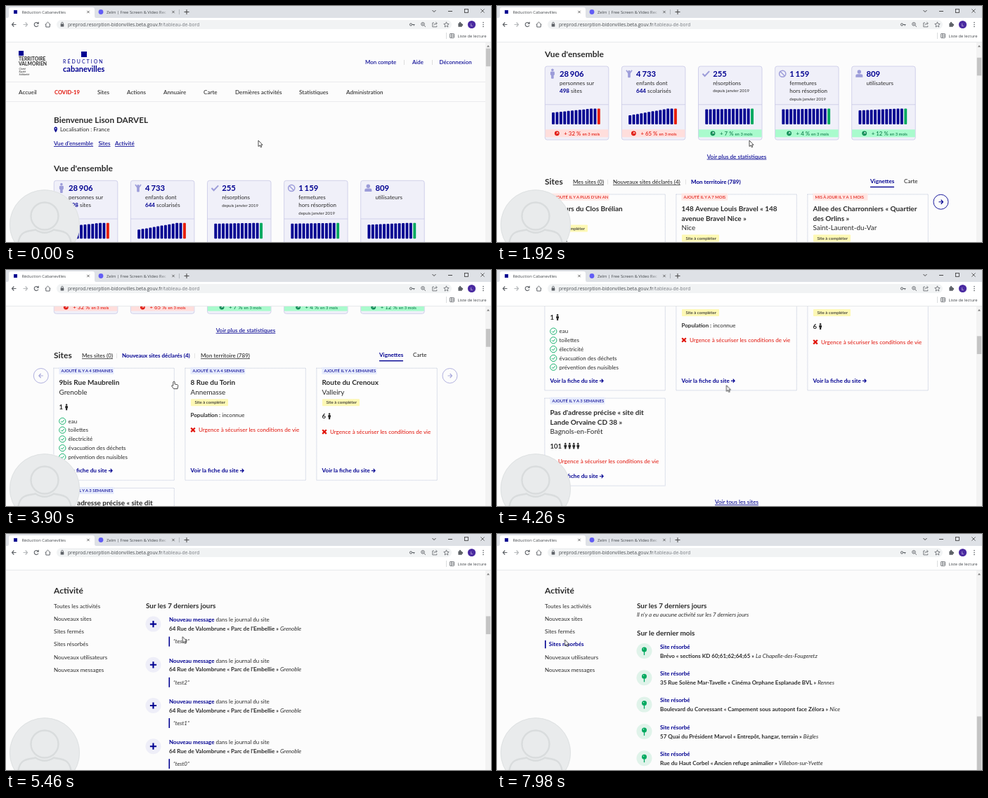
Animation, 690 px wide and 337 px high, one loop 8 s. Source, as an HTML page:

```html
<!DOCTYPE html>
<html lang="fr">
<head>
<meta charset="utf-8">
<title>Tableau de bord</title>
<style>
@property --s { syntax: "<number>"; inherits: true; initial-value: 0; }
html, body { margin: 0; width: 100%; height: 100%; overflow: hidden; background: #fcfcfc; }
svg { display: block; width: 690px; height: 337px; animation: scroll 8s linear infinite; }
text { font-family: Lato, sans-serif; fill: #2b2b2b; white-space: pre; }
.ui { font-family: "Open Sans", sans-serif; fill: #45494d; }
.m { font-weight: 500; }
.b { font-weight: 700; }
.i { font-style: italic; }
.n { fill: #000091; }
.r { fill: #e1140a; }
.g { fill: #0a7a48; }
.w { fill: #fff; }
.l { text-decoration: underline; text-decoration-thickness: .7px; text-underline-offset: 1.2px; }
.tight { word-spacing: -1px; }
#page { transform: translateY(calc(var(--s) * -1px)); }
#thumb { transform: translateY(calc(var(--s) * .0805px)); }
#cursor { animation: move 8s ease-in-out infinite; }
</style>
</head>
<body>
<script>
const LOOP = 8000, NAVY = '#000091', LILAC = '#9c9cd9', RED = '#e1140a', GREEN = '#00a95f', INK = '#2b2b2b';
const ADD_TAB = 3360, PICK_NEW = 5940, PICK_DONE = 7080;
let css = '', spans = 0;

const pct = t => +(t / LOOP * 100).toFixed(3) + '%';
const each = (list, fn) => list.map(fn).join('');
const track = (name, points, rule) =>
  css += `@keyframes ${name}{${each(points, p => `${pct(p[0])}{${rule(p)}}`)}}`;

// Shows a group only from a to b.
function span(a, b, body) {
  const name = 'span' + spans++;
  css += `@keyframes ${name}{0%{visibility:${a ? 'hidden' : 'visible'}}` +
    (a ? `${pct(a)}{visibility:visible}` : '') +
    (b < LOOP ? `${pct(b)}{visibility:hidden}` : '') +
    `100%{visibility:${b < LOOP ? 'hidden' : 'visible'}}}`;
  return `<g style="animation:${name} 8s step-end infinite">${body}</g>`;
}

const text = (x, y, str, size = 8, cls = '', more = '') =>
  `<text x="${x}" y="${+(y + size * .35).toFixed(2)}" font-size="${size}" class="${cls}" ${more}>${str}</text>`;
const part = (str, cls) => `<tspan class="${cls}">${str}</tspan>`;
const rect = (x, y, w, h, fill, rx = 0, more = '') =>
  `<rect x="${x}" y="${y}" width="${w}" height="${h}" fill="${fill}" rx="${rx}" ${more}/>`;
const disc = (x, y, r, fill, more = '') => `<circle cx="${x}" cy="${y}" r="${r}" fill="${fill}" ${more}/>`;
const line = (d, color, w = 1, more = '') =>
  `<path d="${d}" fill="none" stroke="${color}" stroke-width="${w}" ${more}/>`;
const at = (x, y, body) => `<g transform="translate(${x} ${y})">${body}</g>`;
const arrow = (x, y, color, dir = 1, s = 2.6) =>
  at(x, y, line(`M${-s * dir} 0H${s * dir}M${.2 * dir} ${-s}L${s * dir} 0L${.2 * dir} ${s}`, color, 1.2));
const person = (x, y) => at(x, y, disc(0, -3.3, 1.2, INK) + rect(-1.9, -1.8, 3.8, 3.6, INK, 1) + rect(-1.1, 0, 2.2, 4.4, INK, .5));
const cross = (x, y) => at(x, y, line('M-2.8 -2.8L2.8 2.8M2.8 -2.8L-2.8 2.8', RED, 2.2));

function header() {
  const nav = [[18, 'Accueil'], [130, 'Sites'], [172, 'Actions'], [224, 'Annuaire'], [281, 'Carte'],
    [326, 'Dernières activités'], [417, 'Statistiques'], [484, 'Administration']];
  return rect(18, 64, 7, 7, NAVY) +
    text(18, 75.5, 'TERRITOIRE', 6.8, 'b') + text(18, 82.3, 'VALMORIEN', 6.8, 'b') +
    each(['Clarté', 'Équité', 'Solidarité'], (s, i) => text(18.5, 89.5 + i * 4.2, s, 3.8, 'i')) +
    rect(107, 65, 8, 8, NAVY) +
    text(81, 79.5, 'RÉDUCTION', 7, 'n', 'letter-spacing="2"') + text(81, 90.5, 'cabanevilles', 11, 'b n') +
    text(511, 80.5, 'Mon compte', 7.9, 'm n') + text(578, 80.5, 'Aide', 7.9, 'm n') + text(616.5, 80.5, 'Déconnexion', 7.9, 'm n') +
    line('M566.5 77V84M606.5 77V84', '#d5d5d5', .8) +
    line('M0 108.5H682M0 136.5H682', '#e6e6ea', .8) +
    each(nav, ([x, s]) => text(x, 123, s, 8.1, 'm')) + text(69, 123, 'COVID-19', 7.6, 'b r') +
    text(68, 163, 'Bienvenue Lison DARVEL', 11.8, 'b') +
    `<path d="M70.7 180.5C67.5 176.5 68 172.5 70.7 172.5S74 176.5 70.7 180.5Z" fill="${NAVY}"/>` + disc(70.7, 175.2, .9, '#fff') +
    text(77, 176.3, 'Localisation : France', 8) +
    text(68, 196.3, "Vue d'ensemble", 8.1, 'm n l') + text(131.5, 196.3, 'Sites', 8.1, 'm n l') + text(155, 196.3, 'Activité', 8.1, 'm n l') +
    text(68, 232, "Vue d'ensemble", 12, 'b');
}

const statIcons = [
  disc(0, -5.4, 1.8, LILAC) + rect(-3, -3.2, 6, 5.4, LILAC, 1.4) + rect(-1.8, 0, 3.6, 7, LILAC, .8),
  disc(0, -3.2, 1.7, LILAC) + line('M-4 -5L-1.4 -1.2H1.4L4 -5', LILAC, 1.6) + rect(-1.8, -1.4, 3.6, 7, LILAC, .8),
  line('M-4.6 0L-1.5 3.2L5 -3.6', LILAC, 2),
  disc(0, 0, 4.6, 'none', `stroke="${LILAC}" stroke-width="1.5"`) + line('M-3.2 -3.2L3.2 3.2', LILAC, 1.5),
  disc(0, -2.8, 2.7, LILAC) + `<path d="M-5 5V3Q-5 .6 -2 .6H2Q5 .6 5 3V5Z" fill="${LILAC}"/>`
];

function stat(i, num, lines, low, rise, iconX) {
  const bad = i < 2, tone = bad ? RED : '#0a8a52', small = s => s.startsWith('depuis');
  const bars = each([...Array(13).keys()], k => {
    const h = low + (22.5 - low) * Math.min(1, k / 10);
    return rect(9.8 + k * 5.4, 83 - h, 3.9, h, k < 12 ? NAVY : bad ? '#e8200a' : GREEN, 1);
  });
  return at(68.3 + i * 109.1, 249.3,
    rect(0, 0, 90.5, 105, '#f0f0f9', 3, 'stroke="#c8c8e6" stroke-width=".8"') +
    line('M0 54.7H90.5', '#c8c8e6', .8) + at(10.6, 10.7, statIcons[i]) +
    text(20.7, 10.7, num, 11.3, 'b n tight') +
    each(lines, (s, k) => text(20.7, 24 + k * 11.2, s, small(s) ? 6 : 8)) + bars +
    rect(.4, 90.3, 89.7, 11, bad ? '#ffdedc' : '#a9fbcd') + disc(iconX, 95.8, 3.4, tone) +
    line(`M${iconX - 1.3} 97.1L${iconX + 1.2} 94.6M${iconX - .8} 94.4H${iconX + 1.4}V96.6`, '#fff', .7) +
    text(iconX + 10, 95.8, `+ ${rise} % ${part('en 3 mois', 'small')}`, 7.9, 'm ' + (bad ? 'r' : 'g')));
}
css += '.small{font-size:5.9px}';

const card = (x, y, h, tag, old, body) => at(x, y,
  rect(.4, .4, 171.4, h, '#fdfdfd', 0, 'stroke="#aab4cf" stroke-width=".8" stroke-dasharray="1 1"') +
  rect(8, -1, tag.length * 3.08 + 4, 10, old ? '#ffe6e3' : '#e6ebfc') +
  text(11, 4.3, tag, 5.9, 'm ' + (old ? 'r' : 'n')) + body +
  text(8, h - 13.5, 'Voir la fiche du site', 8.1, 'b n') + arrow(81, h - 13.2, NAVY));
const title = (names, town) =>
  each(names, (s, k) => text(8, 21 + k * 13.6, s, 10, 'b')) + text(8, 21 + names.length * 13.6, town, 9.9);
const chip = y => rect(8.5, y - 5, 53, 10, '#fdf8b4', 1) + text(14, y, 'Site à compléter', 6.1, 'm');
const people = (y, n, count) => text(8, y, n, 9.5, 'b') +
  each([...Array(count).keys()], k => person(13 + n.length * 5.6 + k * 6, y));
const urgent = y => cross(11.5, y) + text(19.4, y, 'Urgence à sécuriser les conditions de vie', 8.1, 'r');
const checks = (y, list) => each(list, (s, k) => at(0, y + k * 12.8,
  disc(12.8, 0, 4.6, '#fff', `stroke="${GREEN}" stroke-width=".9"`) + line('M10.6 0L12.3 1.7L15 -1.5', GREEN, 1) + text(21, 0, s, 8)));
const round = (x, dir, color) => disc(x, 443, 10.5, '#fcfcfc', `stroke="${color}" stroke-width=".9"`) + arrow(x, 443, color, dir, 3);

function sites() {
  const X = [67.5, 254.5, 441.5], Y = 431.8, services = ['eau', 'toilettes', 'électricité', 'évacuation des déchets', 'prévention des nuisibles'];
  const mine = text(165, 414.5, 'Nouveaux sites déclarés (4)', 8, 'm l') + text(276, 414.5, 'Mon territoire (789)', 8, 'b n') +
    round(631.5, 1, NAVY) +
    card(X[0], Y, 160, "AJOUTÉ IL Y A PLUS D'UN AN", 1, title(['4 Cours du Clos Brélian'], 'Gap') + chip(49) + people(68, '50', 2) + checks(88, services.slice(0, 3))) +
    card(X[1], Y, 160, 'AJOUTÉ IL Y A 7 MOIS', 1, title(['148 Avenue Louis Bravel « 148', 'avenue Bravel Nice »'], 'Nice') + chip(63) + people(82, '2', 1) +
      urgent(104.3) + text(8, 129, '1 message', 8, 'b n l')) +
    card(X[2], Y, 160, 'MIS À JOUR IL Y A 1 MOIS', 1, title(['Allee des Charronniers « Quartier', 'des Orlins »'], 'Saint-Laurent-du-Var') + chip(63) + people(82, '14', 1) + urgent(104.3));
  const fresh = text(165, 414.5, 'Nouveaux sites déclarés (4)', 8, 'b n') + text(277, 414.5, 'Mon territoire (789)', 8, 'm l') +
    round(631.5, 1, '#a9a9dc') +
    card(X[0], Y, 160, 'AJOUTÉ IL Y A 4 SEMAINES', 0, title(['9bis Rue Maubrelin'], 'Grenoble') + people(56, '1', 1) + checks(76, services)) +
    card(X[1], Y, 160, 'AJOUTÉ IL Y A 4 SEMAINES', 0, title(['8 Rue du Torin'], 'Annemasse') + chip(49.5) +
      text(8, 67.5, part('Population :', 'b') + ' inconnue', 8) + urgent(88.5)) +
    card(X[2], Y, 160, 'AJOUTÉ IL Y A 4 SEMAINES', 0, title(['Route du Crenoux'], 'Valleiry') + chip(49.5) + people(69, '6', 1) + urgent(91.3)) +
    card(X[0], 603, 125, 'AJOUTÉ IL Y A 3 SEMAINES', 0, title(["Pas d'adresse précise « site dit", 'Lande Orvaine CD 38 »'], 'Bagnols-en-Forêt') + people(68.5, '101', 4) + urgent(90.5));
  return text(68, 414, 'Sites', 12, 'b') + text(108, 414.5, 'Mes sites (0)', 8, 'm l') +
    line('M157.5 411V418M268.5 411V418', '#dcdcdc', .8) +
    text(531, 413.5, 'Vignettes', 8.1, 'b n') + text(579, 413.5, 'Carte', 8.1, 'm') + rect(531, 421, 34, 1.4, NAVY) +
    round(49.8, -1, '#a9a9dc') + span(0, ADD_TAB, mine) + span(ADD_TAB, LOOP, fresh) +
    text(341, 751.5, 'Voir tous les sites', 8.1, 'm n l', 'text-anchor="middle"');
}

const pin = color => line('M0 1V6', color, 1.3) + disc(0, -2, 3.5, color) + disc(-1, -3, .8, '#fff', 'opacity=".7"');
const entry = (y, icon, tint, head, name, town) => at(0, y,
  disc(209.5, 6, 11, tint) + at(209.5, 6, icon) + text(232, 0, head, 8) +
  text(232, 12.9, part(name, 'b') + ' ' + part(town, 'i'), 8));
const feed = (list, color, tint, head) =>
  text(199, 821, "Il n'y a eu aucune activité sur les 7 derniers jours", 8, 'i') +
  text(199, 847.8, 'Sur le dernier mois', 10, 'b') +
  each(list, ([name, town], k) => entry(867 + k * 38.3, pin(color), tint, head, name, town));

function activity() {
  const menu = ['Toutes les activités', 'Nouveaux sites', 'Sites fermés', 'Sites résorbés', 'Nouveaux utilisateurs', 'Nouveaux messages'];
  const y = k => 809 + k * 18.2;
  const plain = k => text(68, y(k), menu[k], 8);
  const active = k => rect(68, y(k) - 5.7, 1.6, 11.4, NAVY) + text(73.8, y(k), menu[k], 8, 'b n');
  const plus = line('M-4.6 0H4.6M0 -4.6V4.6', NAVY, 2.1);
  const messages = each([3, 2, 1, 0], (n, k) => {
    const top = 828.6 + k * 58.2;
    return entry(top, plus, '#eeeef8', part('Nouveau message', 'b n') + ' dans le journal du site', "64 Rue de Valombrune « Parc de l'Embellie »", 'Grenoble') +
      rect(231.5, top + 24, 1.6, 14, NAVY) + text(238, top + 31, `“test${n}”`, 8, 'i');
  });
  const opened = [["Pas d'adresse précise « site dit Lande Orvaine CD 38 »", 'Bagnols-en-Forêt'], ['Route du Crenoux', 'Valleiry'],
    ['8 Rue du Torin', 'Annemasse'], ['9bis Rue Maubrelin', 'Grenoble'], ['Rue Orlanne « PARCELLE UNIQUE 5 »', "Villeneuve-d'Ascq"]];
  const solved = [['Brévo « sections KD 60;61;62;64;65 »', 'La Chapelle-des-Fougeretz'],
    ['35 Rue Solène Mar-Tavelle « Cinéma Orphane Esplanade BVL »', 'Rennes'],
    ['Boulevard du Corvessant « Campement sous autopont face Zélora »', 'Nice'],
    ['57 Quai du Président Marvol « Entrepôt, hangar, terrain »', 'Bègles'],
    ['Rue du Haut Corbel « Ancien refuge animalier »', 'Villebon-sur-Yvette']];
  return text(68, 787, 'Activité', 12, 'b') + each([0, 2, 4, 5], plain) +
    span(0, PICK_NEW, plain(1)) + span(PICK_NEW, PICK_DONE, active(1)) + span(PICK_DONE, LOOP, plain(1)) +
    span(0, PICK_DONE, plain(3)) + span(PICK_DONE, LOOP, active(3)) +
    span(6360, 6840, text(68, y(2), menu[2], 8, 'l')) +
    text(199, 809, 'Sur les 7 derniers jours', 9.9, 'b') +
    span(0, PICK_NEW, messages) +
    span(PICK_NEW, PICK_DONE, feed(opened, NAVY, '#eeeef8', part('Nouveau site', 'b n') + ' déclaré')) +
    span(PICK_DONE, LOOP, feed(solved, GREEN, '#e0f3ea', part('Site résorbé', 'b n')));
}

function browser() {
  const x = (cx, cy, s = 1.7, w = .8) => line(`M${cx - s} ${cy - s}L${cx + s} ${cy + s}M${cx + s} ${cy - s}L${cx - s} ${cy + s}`, '#444', w);
  const G = '#5f6368';
  return rect(0, 0, 690, 52, '#fff') + rect(0, 0, 690, 17, '#dee1e6') +
    '<path d="M2 17Q4 17 4 14V5Q4 2 7 2H123Q126 2 126 5V14Q126 17 128 17Z" fill="#fff"/>' +
    rect(11, 6, 5, 5, NAVY) + text(22.5, 8.5, 'Réduction Cabanevilles', 5.8, 'ui') + x(117, 8.5) +
    disc(135, 8.5, 3.4, '#625df5') + text(143, 8.5, 'Zelm | Free Screen &amp; Video Rec', 5.8, 'ui') +
    '<rect x="218" y="3" width="14" height="12" fill="url(#fade)"/>' + x(238, 8.5) +
    line('M246.5 5V12', '#a0a4a8', .7) + line('M253.5 8.5H260.5M257 5V12', '#444', 1) +
    line('M606.5 6L609 8.5L611.5 6M629 7.5H635', '#333', .9) +
    rect(652.5, 4.5, 5, 5, 'none', 0, 'stroke="#333" stroke-width=".8"') + x(678, 7, 2.6) +
    arrow(11.5, 26.5, G, -1, 3) + arrow(27.5, 26.5, '#b4b7ba', 1, 3) +
    line('M45.6 24.6A3 3 0 1 0 46 27.6M46.2 22.8V25.2H43.6', G, 1.1) +
    line('M55.6 26.8L59.5 23L63.4 26.8M56.8 26V30H62.2V26', G, 1) +
    rect(72, 20, 562, 13, '#f1f3f4', 6.5) +
    rect(77.7, 25.6, 4.6, 4, G, .6) + line('M78.6 26V24.6A1.4 1.4 0 0 1 81.4 24.6V26', G, .8) +
    text(88, 26.3, 'preprod.resorption-bidonvilles.beta.gouv.fr' + '<tspan fill="#777b80">/tableau-de-bord</tspan>', 6.7, 'ui') +
    disc(576, 26.5, 1.6, 'none', `stroke="${G}"`) + line('M577.6 26.5H581.5M580.3 26.5V28.3', G, 1) +
    disc(593, 25.8, 2.3, 'none', `stroke="${G}" stroke-width=".9"`) + line('M594.7 27.5L597 29.8M592 25.8H594', G, .9) +
    line('M609 24H606.8V29.8H612.8V28M608.8 27.5Q609 24.8 613 24.8M611.4 23L613.4 24.8L611.4 26.6', G, .8) +
    line('M626.5 22.8L627.6 25.4L630.2 25.6L628.2 27.4L628.8 30L626.5 28.6L624.2 30L624.8 27.4L622.8 25.6L625.4 25.4Z', G, .8) +
    rect(643.4, 24.6, 5.4, 5.2, G, .6) + disc(646, 24, 1.2, G) + disc(649, 27, 1.2, G) +
    disc(662.5, 26.5, 5.6, '#4a2aa0') + text(662.5, 26.5, 'L', 6, 'ui w', 'text-anchor="middle"') +
    each([23.6, 26.5, 29.4], cy => disc(679, cy, .8, G)) +
    line('M626.5 38V47', '#d0d3d6', .8) +
    rect(631.5, 39.5, 6, 6, 'none', .6, `stroke="${G}" stroke-width=".8"`) + line('M633.5 39.5V45.5M633.5 41.5H637.5M633.5 43.5H637.5', G, .7) +
    text(642.5, 42.6, 'Liste de lecture', 5.8, 'ui') + line('M0 51.6H690', '#dfe1e4', .8);
}

const scrollbar = () => rect(682, 52, 8, 285, '#f3f3f3') + '<path d="M684 58.5L686 56L688 58.5Z" fill="#777"/>' +
  span(0, PICK_NEW, `<g id="thumb">${rect(682.8, 60.6, 6.4, 25.6, '#c4c4c4')}</g>`) +
  span(PICK_NEW, PICK_DONE, rect(682.8, 207, 6.4, 65.5, '#c4c4c4')) +
  span(PICK_DONE, LOOP, rect(682.8, 260.5, 6.4, 76.5, '#c4c4c4'));

const avatar = () => disc(55, 312.3, 50, '#e9ebec') + '<g clip-path="url(#face)">' +
  disc(55, 300, 19.5, 'none', 'stroke="#d9dcdd" stroke-width="2.4"') +
  line('M17 345C17 318 34 322 42 319.5Q55 328 68 319.5C76 322 93 318 93 345', '#d9dcdd', 2.4) + '</g>' +
  disc(55, 312.3, 49.5, 'none', 'stroke="#dfe2e3" stroke-width="1"');

function cursor() {
  const pointer = '<path d="M0 0V8.6L2 6.8L3.4 9.8L4.8 9.2L3.5 6.3H6Z" fill="#fff" stroke="#222" stroke-width=".8"/>';
  const hand = '<path d="M-1.2 .8Q0 -.8 1.1 .8V4L5 4.8Q6 5.2 5.8 6.6L5 10.6H-.4L-3.4 6.6Q-3.4 5 -1.2 6.2Z" fill="#fff" stroke="#222" stroke-width=".8"/>';
  const over = [[2640, 4020], [5700, 7500]];
  return `<g id="cursor">${span(0, 2640, pointer)}${span(4020, 5700, pointer)}${span(7500, LOOP, pointer)}${each(over, ([a, b]) => span(a, b, hand))}</g>`;
}

track('scroll', [[0, 0], [1530, 0], [1920, 163], [2300, 253], [3480, 253], [3720, 292], [3960, 292], [4260, 420], [4740, 555],
  [4980, 555], [5460, 706], [8000, 706]], p => `--s:${p[1]}`);
track('move', [[0, 359, 192], [2340, 359, 192], [2820, 299, 164], [2940, 299, 164], [3300, 215, 162], [3420, 215, 162], [3840, 239, 159],
  [3960, 239, 159], [4440, 362, 167], [5160, 362, 167], [5820, 101, 119], [6060, 101, 119], [6480, 100, 139], [6720, 100, 139],
  [7020, 99, 156], [7200, 99, 156], [7560, 96.5, 151], [8000, 96.5, 151]], p => `transform:translate(${p[1]}px,${p[2]}px)`);

const since = 'depuis janvier 2019', num = n => part(n, 'b n');
const stats = [
  ['28 906', ['personnes sur', num(498) + ' sites'], 17, 32, 17],
  ['4 733', ['enfants dont', num(644) + ' scolarisés'], 13, 65, 17],
  ['255', ['résorptions', since], 21.5, 7, 20.5],
  ['1 159', ['fermetures', 'hors résorption', since], 21.5, 4, 20],
  ['809', ['utilisateurs'], 20, 12, 18]
];

document.body.innerHTML = `<svg viewBox="0 0 690 337">
<defs><linearGradient id="fade"><stop stop-color="#dee1e6" stop-opacity="0"/><stop offset="1" stop-color="#dee1e6"/></linearGradient>
<clipPath id="face"><circle cx="55" cy="312.3" r="49"/></clipPath></defs>
${rect(0, 0, 690, 337, '#fcfcfc')}
<g id="page">${header()}${each(stats, (s, i) => stat(i, ...s))}
${text(341, 378, 'Voir plus de statistiques', 8.1, 'm n l', 'text-anchor="middle"')}${sites()}${activity()}</g>
${scrollbar()}${browser()}${avatar()}${cursor()}</svg>`;
const sheet = document.createElement('style');
sheet.textContent = css;
document.head.append(sheet);
</script>
</body>
</html>
```
